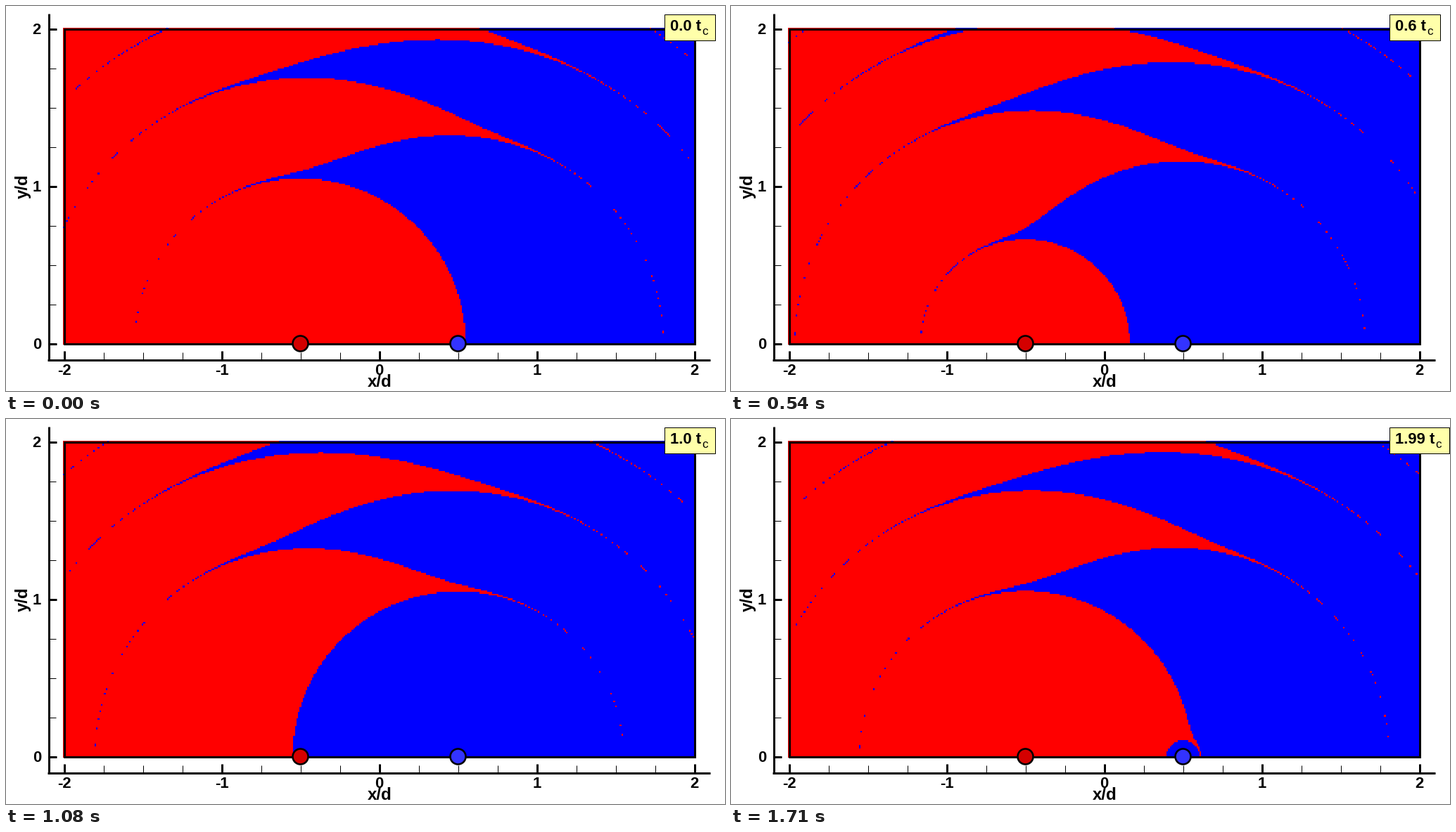
Animation of 1022x548 px, one loop 1.8 s. Source, as a matplotlib script:

```python
import numpy as np
import matplotlib.pyplot as plt
from matplotlib.animation import FuncAnimation
from matplotlib.colors import ListedColormap
from matplotlib.patches import Circle, Rectangle

W, H, DPI = 1022, 548, 100
UNIT = 224          # pixels per length d
K = 1.1             # area drained per half period, over pi d^2
TIMES = ([i / 10 for i in range(10)] + [0.95, 0.99, 1.0]
         + [1.1, 1.3, 1.5, 1.7, 1.9, 1.95, 1.99])

plt.rcParams["font.family"] = "Liberation Sans"


def px(x):
    return 82.5 + UNIT * (x + 2)


def py(y):
    return 480.5 - UNIT * y


def pt(pixels):
    return pixels * 72 / DPI


X, Y = np.meshgrid(np.linspace(-2, 2, 401), np.linspace(0, 2, 201))
GRID = X + 1j * Y


def basins(t):
    """Which of two alternating point sinks drains each grid point (0 or 1)."""
    z = GRID.copy()
    owner = np.zeros(z.shape)
    live = np.ones(z.shape, bool)
    phase, left = int(t), 1 - t % 1
    for _ in range(80):
        sink = 0.5 if phase else -0.5
        w = z - sink
        d2 = np.maximum(w.real ** 2 + w.imag ** 2, 1e-12)
        hit = live & (d2 <= K * left)
        owner[hit] = phase
        live &= ~hit
        if not live.any():
            break
        z = sink + w * np.sqrt(np.maximum(1 - K * left / d2, 0))
        phase, left = 1 - phase, 1
    return owner


fig = plt.figure(figsize=(W / DPI, H / DPI), dpi=DPI, facecolor="white")
ax = fig.add_axes([0, 0, 1, 1])

half = 0.005
field = ax.imshow(
    basins(0), cmap=ListedColormap(["#ff0000", "#0000ff"]), vmin=0, vmax=1,
    origin="lower", interpolation="nearest", aspect="auto", zorder=1,
    extent=(px(-2 - half), px(2 + half), py(-half), py(2 + half)))
ax.set_xlim(0, W)
ax.set_ylim(H, 0)
ax.axis("off")


def line(x0, y0, x1, y1, width):
    ax.plot([x0, x1], [y0, y1], color="black", lw=pt(width),
            solid_capstyle="butt", snap=True, zorder=3)


def box(x, y, w, h, width, face, z):
    return ax.add_patch(Rectangle((x, y), w, h, fc=face, ec="black",
                                  lw=pt(width), joinstyle="miter",
                                  snap=True, zorder=z))


def text(x, y, s, size=22, weight="bold", **kw):
    return ax.text(x, y, s, fontsize=pt(size), weight=weight,
                   va="baseline", zorder=7, **kw)


box(px(-2), py(2), 4 * UNIT, 2 * UNIT, 3, "none", 2)

# Axes with inward ticks
AX, AY = 60.5, 503.5
line(AX, 11, AX, 505, 3)
line(59, AY, 1001, AY, 3)
for k in range(17):
    x = px(-2 + k / 4)
    major = k % 4 == 0
    line(x, AY, x, 491 if major else 493, 3 if major else 1)
    if major:
        text(x, 525, str(k // 4 - 2), ha="center")
for k in range(9):
    y = py(k / 4)
    major = k % 4 == 0
    line(AX, y, 72 if major else 71, y, 3 if major else 1)
    if major:
        text(50, y + 8, str(k // 4), ha="right")
text(531, 542, "x/d", 24, ha="center")
text(31, 257, "y/d", 24, ha="center", rotation=90, rotation_mode="anchor")

for x, color in ((-0.5, "#d40000"), (0.5, "#3333ff")):
    ax.add_patch(Circle((px(x), py(0)), 11, fc=color, ec="black",
                        lw=pt(2.6), zorder=4))

# Time tag
tag = box(935.5, 11.5, 72, 37, 1, "#ffffaa", 6)
clock = text(944, 35, "0.0 t")
sub = text(989, 41, "c", 17, "normal")


def update(i):
    t = TIMES[i]
    label = f"{t:.1f}" if round(t * 100) % 10 == 0 else f"{t:.2f}"
    wide = len(label) > 3
    field.set_data(basins(t))
    clock.set_text(label + " t")
    sub.set_x(1001 if wide else 989)
    tag.set_width(85 if wide else 72)
    return field, clock, sub, tag


anim = FuncAnimation(fig, update, frames=len(TIMES), interval=90,
                     repeat=True, repeat_delay=0, blit=False)
plt.show()
```
